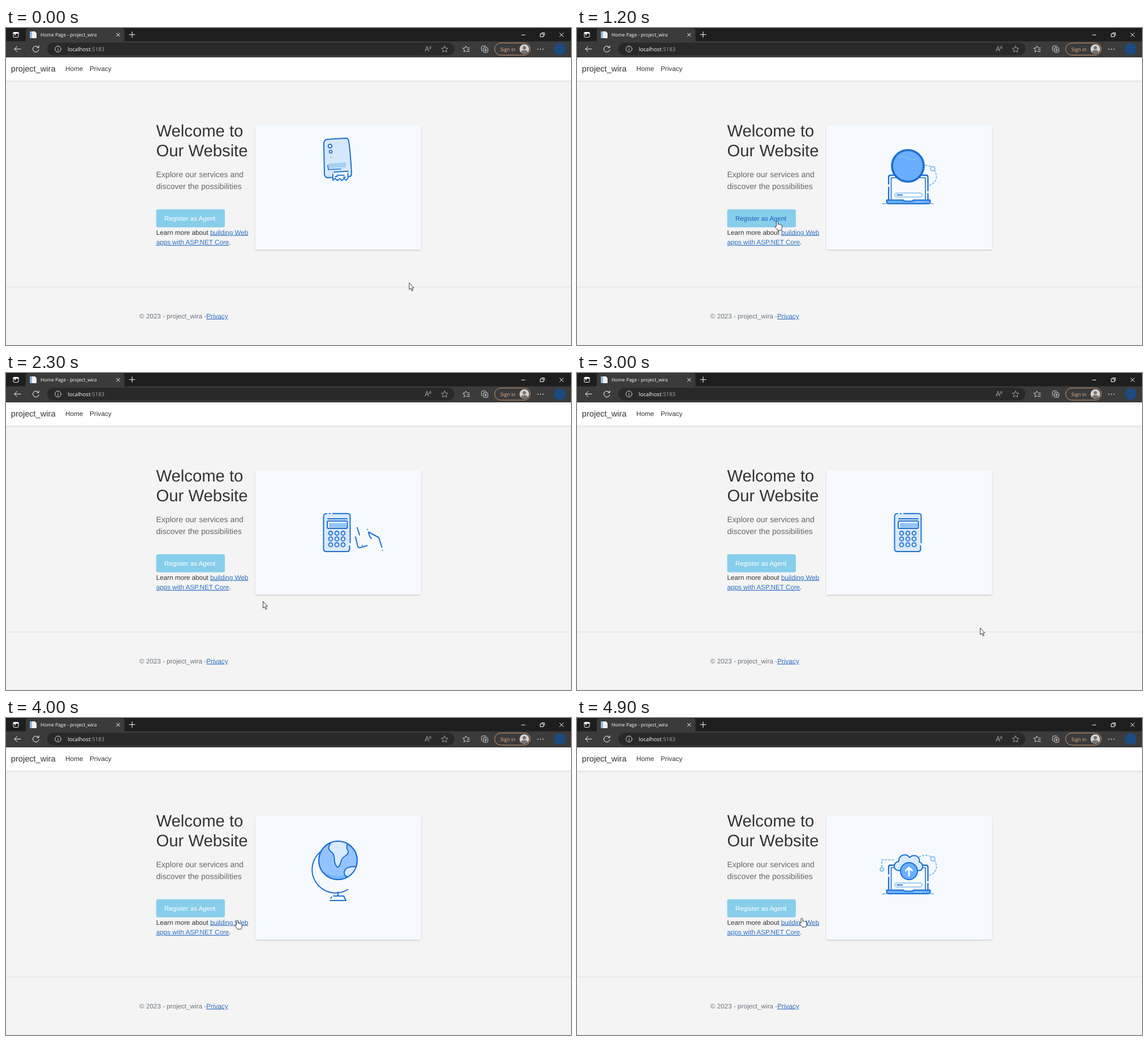
An HTML page for the animation above (5000 ms loop, 999 by 561 pixels).

```html
<!DOCTYPE html>
<html lang="en">
<head>
<meta charset="utf-8">
<title>Home Page - project_wira</title>
<style>
  html, body { margin: 0; height: 100%; overflow: hidden; background: #f4f4f4; }
  svg { display: block; width: 100vw; height: 100vh; }
  text { font: 11.7px "Liberation Sans", Arial, sans-serif; fill: #333; white-space: pre; text-rendering: geometricPrecision; }
  .ui text { font-family: "Open Sans", sans-serif; fill: #fff; }
  .link { fill: #2f70c2; text-decoration: underline; }
  .icons { fill: none; stroke: #ddd; stroke-width: 1; stroke-linecap: round; stroke-linejoin: round; }
  #art { fill: none; stroke: #1b6fd0; stroke-width: 2; stroke-linecap: round; stroke-linejoin: round; }
  #art .pale { fill: #d9eaff; }
  #art .mid { fill: #94c4ff; }
  #art .deep { fill: #6aaeff; }
  #art .soft { stroke: #84bfee; }
  #art .dash { stroke-dasharray: 2.5 3.5; }
</style>
</head>
<body>
<svg viewBox="0 0 999 561">
  <defs>
    <filter id="shadow" x="-5%" y="-5%" width="110%" height="115%">
      <feDropShadow dx="0" dy="1.5" stdDeviation="1.6" flood-opacity=".16"/>
    </filter>
    <clipPath id="ball"><circle cx="587" cy="252" r="34"/></clipPath>
    <clipPath id="egg"><ellipse cx="588" cy="232" rx="34" ry="37"/></clipPath>
  </defs>
  <rect width="999" height="561" fill="#f4f4f4"/>

  <!-- browser bars -->
  <g class="ui">
    <path d="M0 0H999V24H0z" fill="#1e1e1e"/>
    <path d="M0 23.500H999V52H0z M35 24V5Q35 .5 39 .5H205Q209.500 .5 209.500 5V24z" fill="#3b3b3b"/>
    <rect x="73" y="26" width="720" height="22.500" rx="11.200" fill="#292929"/>
    <path d="M42.500 6H51L54 9V18H42.500z" fill="#eef2f8"/>
    <path d="M42.500 6H46V18H42.500z" fill="#8fb9e2"/>
    <text x="61" y="15" style="font-size:8.400px">Home Page - project_wira</text>
    <text x="109" y="41" style="font-size:9.650px">localhost<tspan fill="#a5a5a5">:5183</tspan></text>
    <g class="icons">
      <rect x="13" y="7.500" width="9" height="9" rx="1.500" stroke="#fff"/>
      <path d="M13 9H22M16 9V12" stroke="#fff" stroke-width="1.800"/>
      <path d="M195.500 9.300l5.500 5.500m0-5.500l-5.500 5.500M218 11.700h10M223 6.700v10M911.500 12.300h6M979 8.800l6.500 6.500m0-6.500l-6.500 6.500" stroke="#fff"/>
      <path d="M945 10.300h5.200v5.200h-5.200zM947 8.500h5v5" stroke="#fff"/>
      <path d="M15 37.200h11M19.500 32.500L15 37.200l4.500 4.700" stroke="#fff"/>
      <path d="M57 34A5.300 5.300 0 1 0 58 38.500M58 31.500V34.800H54.700" stroke="#fff"/>
      <circle cx="92" cy="37.200" r="5.300"/>
      <path d="M92 36.700V40M92 34.500v.1"/>
      <path d="M741 41.200l3.300-9 3.300 9M742.200 38.200h4.200M748.500 33q1.500 1.500 0 3.500M750.500 32q2.200 2.500 0 5" stroke="#aaa"/>
      <path id="star" d="M775.500 31.800l1.700 3.600 4 .5-2.900 2.700.8 3.900-3.600-2-3.600 2 .8-3.900-2.900-2.700 4-.5z" stroke="#aaa"/>
      <path d="M819.500 35.500H816L813 32l-1.700 3.400-3.600.5 2.800 2.700-.7 3.700 2.700-1.700M815.500 38.500h4M814.500 41.500h5"/>
      <rect x="844" y="35" width="8" height="8" rx="1.500"/>
      <path d="M842 41Q840.800 40 840.800 38.500V34Q841 32 843 31.800H847Q849 32 849.500 33.200M848 37v4m-2-2h4"/>
      <path d="M940.500 37.500h.1M945 37.500h.1M949.500 37.500h.1" stroke-width="1.800"/>
      <rect x="864" y="26.500" width="63" height="21.500" rx="10.700" stroke="#d09a6c"/>
    </g>
    <text x="874" y="40.500" style="font-size:8.700px;fill:#e8b48a">Sign in</text>
    <circle cx="916.500" cy="37.200" r="8.500" fill="#d6d2cf"/>
    <circle cx="916.500" cy="35" r="3" fill="#77716e"/>
    <path d="M910.500 43Q911 39 916.500 39T922.500 43Q916.500 47.500 910.500 43" fill="#77716e"/>
    <circle cx="979" cy="37.200" r="10.500" fill="#1c4b80"/>
  </g>

  <!-- page -->
  <path d="M0 94H999V97H0z" fill="#efefef"/>
  <path d="M0 52H999V93H0z" fill="#fff"/>
  <path d="M0 93.500H999M0 458.300H999" stroke="#dfe0e1"/>
  <text x="8.800" y="77.300" style="font-size:14.620px">project_wira</text>
  <text x="105" y="76">Home</text>
  <text x="148" y="76">Privacy</text>
  <g style="--h:29.250px">
    <text x="265.500" y="192" style="font-size:29.250px">Welcome to</text>
    <text x="265.500" y="227" style="font-size:29.250px">Our Website</text>
  </g>
  <text x="265.500" y="263.700" style="font-size:14.040px;fill:#666">Explore our services and</text>
  <text x="265.500" y="284.800" style="font-size:14.040px;fill:#666">discover the possibilities</text>
  <rect x="265.500" y="320.700" width="121.500" height="32" rx="3.500" fill="#87ceeb"/>
  <text id="button" x="280" y="340.700" style="font-size:11.450px">Register as Agent</text>
  <text x="265.500" y="365.500">Learn more about <tspan class="link">building Web</tspan></text>
  <text x="265.500" y="383"><tspan class="link">apps with ASP.NET Core</tspan>.</text>
  <text x="235.800" y="513.600" fill="#6c757d" style="fill:#6c757d">© 2023 - project_wira -<tspan class="link">Privacy</tspan></text>
  <rect x="441" y="172" width="292.500" height="220" rx="3.500" fill="#f6fafe" filter="url(#shadow)"/>

  <!-- card illustration -->
  <g id="art">
    <g id="drop">
      <path class="soft" d="M584 241V264.500M586.500 233.500V241"/>
      <path class="pale" d="M572 319Q573 311.500 581 311.500H592Q600 312 601 319.500Q601 322 598.500 322H574Q572 322 572 319z"/>
    </g>

    <g id="stand">
      <path id="arc" pathLength="100" d="M561 233A41.300 41.300 0 0 0 604.500 303.500"/>
      <path d="M553.500 252Q553 245 557 240M587 308V315M579 315H597L601 323H573M574.500 319l1-2"/>
    </g>

    <g id="globe">
      <circle class="mid" cx="587" cy="252" r="34"/>
      <g clip-path="url(#ball)">
        <path d="M553 265Q587 297 621 260V290H553z" fill="#6fb0fb" stroke="none" opacity=".75"/>
        <path id="land" class="pale" d="M576 214L570 228Q569 234 576 238Q580 242 580 253Q582 263 586 264Q590 262 592 252Q594 247 602 242Q606 238 603 233Q600 227 606 214zM599 279Q594 271 603 265Q612 261 626 265L616 287z"/>
      </g>
      <circle cx="587" cy="252" r="34"/>
    </g>

    <g id="laptop">
      <path d="M551 304V282M551 276V264Q551 260.500 554.500 260.500H617Q620.500 260.500 620.500 264V288M620.500 293V304" stroke-width="2.300"/>
      <path d="M555.500 303V265H616V303" stroke-width="1.600"/>
      <rect class="soft" x="562" y="292" width="48" height="7" rx="3.500" fill="#fff" stroke-width="1.600"/>
      <path id="bar" d="M566 295.500H575"/>
      <path class="deep" d="M547.500 304.500H577Q578 306.500 581 306.500H591Q594 306.500 595 304.500H624.500V308Q624 311 621 311H551Q548 311 547.500 308z"/>
      <path class="soft" d="M540 311H546M626 311H630M598 308h12"/>
    </g>

    <g id="rise">
      <path class="mid" d="M547.500 260H624.500V263Q624 265.500 621 265.500H551Q548 265.500 547.500 263z"/>
      <path d="M553 259L555 250M552.800 246l.5-3M558 259V252M617 259l-2-8M622 259l-3-9M627 278L623 287M575 318L573 323.500M587 315v.3"/>
      <path class="soft" d="M564.500 310.500H605.500M621 244v.2M626 246v.2"/>
      <ellipse class="mid" cx="588" cy="232" rx="34" ry="37"/>
      <g clip-path="url(#egg)">
        <path class="pale" d="M608 205Q615 208 616 213Q611 215 613 222Q606 225 600 220Q595 223 597 231Q594 235 589 235Q588 252 594 270L630 275V200z"/>
      </g>
      <path d="M615 210A34 37 0 1 0 594 268.500Q617 264 622 236M621 229L620 222M617.500 216v.1"/>
    </g>

    <g id="links">
      <path class="soft dash" d="M605 246Q617 240 627 246M632 252Q637 260 635 268Q631 276 622 279"/>
      <circle class="soft" cx="629" cy="249" r="3.800"/>
    </g>
    <g id="left">
      <path class="soft dash" d="M539 263V251H562"/>
      <circle class="soft" cx="539" cy="268" r="3"/>
    </g>
    <path id="cloud" class="pale" d="M568 270Q560 268 561 261Q563 254 569 254Q568 245 577 242.500Q584 241 588 247Q592 242 600 244Q607 248 605 255Q612 257 611 264Q610 270 604 270z"/>
    <g id="badge">
      <circle class="deep" cx="587" cy="271" r="15"/>
      <path id="wave" class="soft" d="M579 263Q584 261 587 264T595 264" stroke-width="1"/>
      <path id="up" d="M587 279V265M581.500 270L587 264.500L592.500 270" stroke="#fff" stroke-width="3"/>
    </g>

    <g id="pos">
      <rect x="561.500" y="249" width="47.500" height="67" rx="4" fill="#d9e9fc" stroke="none"/>
      <path d="M567 248.700Q561.500 248.500 561.500 254V311Q561.500 316 566.500 316H603Q607.500 316 607.500 311V306M608.500 300V254Q609 248.700 604 248.700H578M571.500 248.700h1.500"/>
      <path d="M569 258H603"/>
      <rect x="568" y="262" width="35.500" height="13" rx="2" fill="#fff"/>
      <path d="M571 265.500H602V273.500H571z" fill="#90c5ff" stroke="none"/>
      <g id="keys" stroke-width="1.800"></g>
    </g>
    <path id="hand" d="M621 273.500L625 286.500M618 290L622 307Q623 310 626 309L638.500 305.500M630 305v.1M639 277v.1M646 293Q642 289 641 281.500L658 290.500Q660 292 660.500 295L664.500 308.500M665.500 314v.1"/>

    <g id="printer">
      <path d="M562 205Q562 198 568 197L601 195Q605 195 606 200Q609 220 611 258Q611 263 606 263L569 265Q564 265 563 259z" fill="#d6e8fd"/>
      <path d="M570 240L601 238V246.500L571 248z" fill="#a6cff0" stroke="none"/>
      <circle cx="573" cy="209" r="3.300" fill="#fff"/>
      <circle cx="574" cy="219" r="2.500" stroke-width="1.600"/>
      <circle cx="574.500" cy="229" r=".6" stroke-width="1.500" class="soft"/>
      <path d="M569 243L570 250.500L592 249.500" stroke-width="1.700"/>
      <path d="M578 255H604V268L600 266L596 270L592 266L588 270L584 266L579 270z" fill="#fff" stroke="none"/>
      <path d="M578 258V269.500L582 266L586 270L590 266.500L594 270L598 266L601 269.500L604.500 266V257M580 255L605 253.500M585 260.500H598M582 263h4M597 264h3" stroke-width="1.800"/>
    </g>
  </g>

  <g stroke="#222" stroke-width=".9" stroke-linejoin="round" fill="#fff">
    <path id="arrow" d="M.5 0V12L3.200 9.700L5.300 14.300L7.200 13.400L5.100 9H8.700z"/>
    <path id="finger" d="M-1.400 9.500V1.500Q0-.8 1.500 1.500V6Q3.200 4.700 4 6.500Q5.600 5.400 6.500 7.100Q8.300 6.400 8.600 8.500V11.500Q8.500 14 7 16.500H.8Q-.5 14.500-3.800 11Q-4.300 8.800-2.600 9z"/>
  </g>
</svg>
<script>
const $ = id => document.getElementById(id);
const LOOP = 5000, CYCLE = 3400;
let p = 0;

$('keys').innerHTML = [...Array(9)].map((_, i) =>
  `<circle cx="${574 + i % 3 * 11}" cy="${283.5 + (i / 3 | 0) * 10.2}" r="3.5"/>`).join('');

// eased progress of the cycle between times a and b
const ease = (a, b) => {
  const x = Math.min(1, Math.max(0, (p - a) / (b - a)));
  return x * x * (3 - 2 * x);
};
const mix = (a, b, x) => a + (b - a) * x;
const alpha = (id, a) => $(id).style.opacity = a;
const during = (id, a, b) => alpha(id, p >= a && p < b ? 1 : 0);
const place = (id, cx, cy, dx, dy, sx = 1, sy = sx) =>
  $(id).setAttribute('transform', `translate(${cx + dx} ${cy + dy}) scale(${sx} ${sy}) translate(${-cx} ${-cy})`);

// pointer stops: time, x, y
const stops = [[0, 712.5, 451], [200, 712.5, 451], [500, 463.5, 373], [700, 354, 341.5], [1000, 353, 341.5],
  [1200, 354, 341.5], [1500, 397.5, 353.5], [2300, 454, 404], [2900, 712.5, 451], [CYCLE, 712.5, 451]];

function pointer() {
  const i = stops.findIndex(s => s[0] > p), [a, b] = [stops[i - 1], stops[i]];
  const f = (p - a[0]) / (b[0] - a[0]), x = mix(a[1], b[1], f), y = mix(a[2], b[2], f);
  const over = x > 265 && x < 387 && y > 321 && y < 353;
  const link = x > 361 && x < 429 && y >= 353 && y < 370;
  alpha('arrow', over || link ? 0 : 1);
  alpha('finger', over || link ? 1 : 0);
  place('arrow', 0, 0, x, y);
  place('finger', 0, 0, x, y);
  $('button').style.fill = over ? '#1d5fc0' : '#fff';
}

function art() {
  during('drop', 150, 300);

  during('stand', 300, 950);
  const drawn = 100 * ease(200, 450);
  $('arc').style.strokeDasharray = `${drawn} 200`;
  during('globe', 250, 1000);
  place('globe', 587, 252, 0, mix(0, -18, ease(850, 1000)), ease(200, 450));
  place('land', 587, 252, mix(0, 22, ease(550, 1000)), 0);

  during('rise', 1000, 1100);

  const leave = 1 - ease(1850, 2050);
  during('laptop', 1100, 2050);
  place('laptop', 587, 290, 0, mix(-14, 0, ease(1000, 1200)), leave);
  $('bar').setAttribute('d', `M566 295.500H${mix(575, 606, ease(1500, 1850))}`);

  const sink = ease(1200, 1500), size = mix(28 / 15, 1, sink);
  during('badge', 1100, 2050);
  place('badge', 587, 271, mix(-2, 0, sink), mix(-27, 0, sink), size * leave);
  alpha('wave', 1 - ease(1200, 1300));
  alpha('up', ease(1350, 1450));
  during('cloud', 1300, 2050);
  place('cloud', 587, 271, 0, 0, ease(1250, 1450) * leave);
  during('links', 1200, 1900);
  during('left', 1400, 1900);

  during('pos', 1950, 3200);
  place('pos', 585, 282, 0, mix(0, -15, ease(3050, 3200)), ease(1900, 2150));
  during('hand', 2200, 3000);
  place('hand', 640, 292, mix(0, -9, ease(2400, 2700)) + 14 * ease(2800, 3000), 0);

  alpha('printer', p >= 3200 || p < 150 ? 1 : 0);
  const lift = p < 200 ? 1 : ease(3050, CYCLE);
  place('printer', 586, 232, 0, mix(50, 0, lift), p < 200 ? 1 - ease(0, 200) : 1);
}

function frame() {
  const t = Math.floor(performance.now() % LOOP / 100) * 100;
  p = t % CYCLE;
  pointer();
  art();
  requestAnimationFrame(frame);
}
frame();
</script>
</body>
</html>
```
